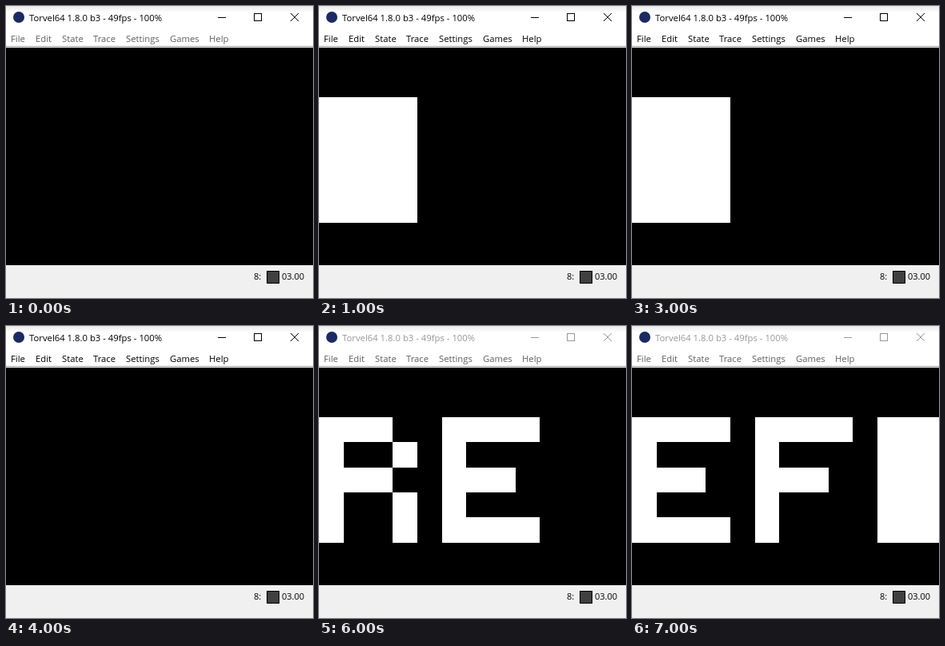
Recreate the animation shown at these times as an HTML page. Size 384 by 365 pixels, loop 8 s.

```html
<!DOCTYPE html>
<html lang="en">
<head>
<meta charset="utf-8">
<title>Emulator window</title>
<style>
  html, body { margin: 0; width: 100%; height: 100%; overflow: hidden; background: #fff; }
  svg { display: block; width: 384px; height: 365px; }
  text { font: 500 11.3px "Open Sans", "Noto Sans", sans-serif; }
  .status { font-size: 11px; }
  .caption, .menu, .cursor, .word1, .word2 { animation: 8s step-end infinite; }
  .caption { color: #000; animation-name: caption; }
  .caption text { fill: currentColor; }
  .buttons { fill: none; stroke: currentColor; }
  .menu { fill: #606060; animation-name: menu; }
  .cursor { animation-name: blink; }
  .word1 { animation-name: first; }
  .word2 { animation-name: second; }
  .screen { fill: #fff; }
  .screen, .led { shape-rendering: crispEdges; }

  @keyframes caption { 0% { color: #000; } 75%, 100% { color: #999; } }
  @keyframes menu {
    0% { fill: #606060; }
    12.5% { fill: #000; }
    75%, 100% { fill: #606060; }
  }
  @keyframes blink {
    0%, 25%, 50%, 75%, 100% { visibility: hidden; }
    12.5%, 37.5%, 62.5% { visibility: visible; }
  }
  @keyframes first {
    0%, 87.5%, 100% { visibility: hidden; }
    75% { visibility: visible; }
  }
  @keyframes second {
    0% { visibility: hidden; }
    87.5%, 100% { visibility: visible; }
  }
</style>
</head>
<body>
<svg viewBox="0 0 384 365">
  <linearGradient id="shade" x2="0" y2="1">
    <stop stop-color="#e8e8e8"/>
    <stop offset="1" stop-color="#fff"/>
  </linearGradient>
  <rect width="384" height="365" fill="#fff"/>
  <rect width="384" height="8" fill="url(#shade)"/>

  <g class="caption">
    <circle cx="16" cy="14" r="7" fill="#1c2a63"/>
    <text x="29" y="19">Torvel64 1.8.0 b3 - 49fps - 100%</text>
    <g class="buttons">
      <path d="M265 14.5H275M310.5 9.5H319.5V18.5H310.5Z" shape-rendering="crispEdges"/>
      <path d="M356 9L366 19M366 9L356 19"/>
    </g>
  </g>

  <g class="menu">
    <text x="6" y="45">File</text>
    <text x="37" y="45">Edit</text>
    <text x="70" y="45">State</text>
    <text x="109" y="45">Trace</text>
    <text x="150" y="45">Settings</text>
    <text x="205" y="45">Games</text>
    <text x="254" y="45">Help</text>
  </g>

  <rect y="50" width="384" height="1" fill="#a0a0a0"/>
  <rect y="52" width="384" height="272" fill="#000"/>

  <g class="screen">
    <path class="cursor" d="M0 114H123V271H0Z"/>
    <g class="word1">
      <path d="M0 114H92V145H31V177H92V208H31V271H0ZM92 145H123V177H92ZM92 208H123V271H92Z"/>
      <path d="M154 114H276V145H184V177H246V208H184V239H276V271H154Z"/>
    </g>
    <g class="word2">
      <path d="M0 114H123V145H31V177H92V208H31V239H123V271H0Z"/>
      <path d="M154 114H276V145H184V177H246V208H184V271H154Z"/>
      <path d="M307 114H384V271H307Z"/>
    </g>
  </g>

  <rect y="324" width="384" height="41" fill="#f0f0f0"/>
  <text class="status" x="310" y="342">8:</text>
  <g class="led">
    <rect x="326" y="331" width="16" height="16" fill="#000"/>
    <rect x="327" y="332" width="14" height="14" fill="#404040"/>
  </g>
  <text class="status" x="345" y="342">03.00</text>
</svg>
</body>
</html>
```
